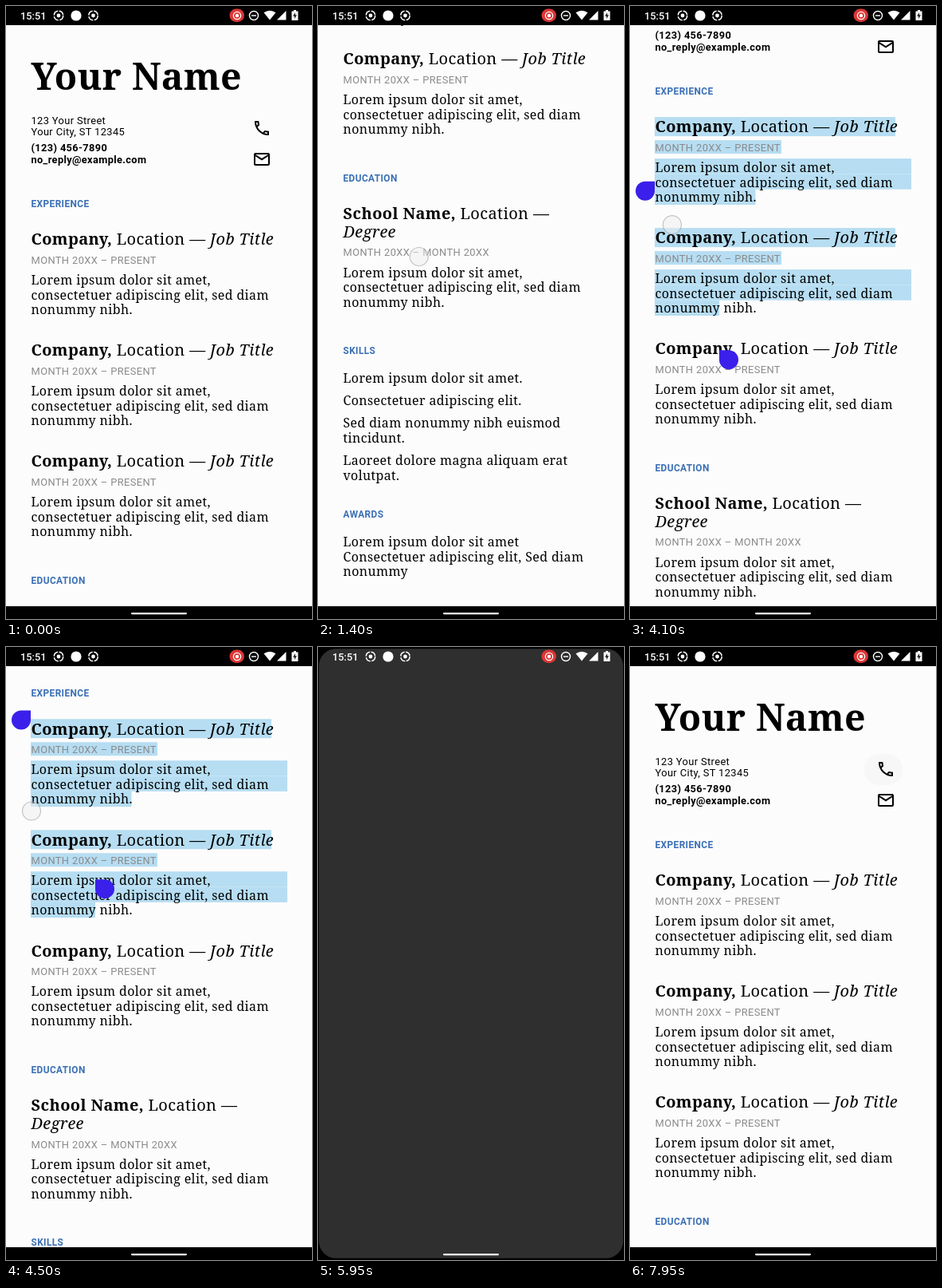
An HTML page for the animation above (8 s loop, 384 by 768 pixels).

```html
<!DOCTYPE html>
<html lang="en">
<head>
<meta charset="utf-8">
<title>Resume viewer</title>
<style>
html, body { margin: 0; width: 100%; height: 100%; overflow: hidden; background: #000; }
#stage { display: block; width: 384px; height: 768px; }
text { white-space: pre; font-family: Roboto, sans-serif; }
.title, .head, .body { font-family: "Noto Serif", serif; letter-spacing: .36px; }
.title { font-size: 46.4px; font-weight: 700; }
.head { font-size: 20px; }
.body { font-size: 16px; }
.b { font-weight: 700; }
.i { font-style: italic; }
.info { font-size: 12.9px; letter-spacing: .36px; }
.info.b { font-size: 12.8px; }
.date { font-size: 12.9px; letter-spacing: .38px; fill: #8b8b8b; }
.label { font-size: 11.9px; letter-spacing: .38px; font-weight: 700; fill: #3b70b5; }
.mid { text-anchor: middle; }
</style>
</head>
<body>
<svg id="stage" viewBox="0 0 384 768" xmlns="http://www.w3.org/2000/svg">
  <rect width="384" height="768"/>
  <g id="docWin">
    <rect width="384" height="768"/>
    <svg y="24" width="384" height="728" viewBox="0 24 384 728">
      <rect y="24" width="384" height="728" fill="#fcfcfc"/>
      <g id="doc">
        <g id="marks" fill="#b6ddf2"></g>
        <rect id="ripple" x="294" y="134" width="48" height="39" rx="19" fill="#d9d9d9"/>
        <path transform="translate(309 141)" d="M6.54 5c.06.89.21 1.76.45 2.59l-1.2 1.2c-.41-1.2-.67-2.47-.76-3.79h1.51m9.86 12.02c.85.24 1.72.39 2.6.45v1.49c-1.32-.09-2.59-.35-3.8-.75l1.2-1.19M7.5 3H4c-.55 0-1 .45-1 1 0 9.39 7.61 17 17 17 .55 0 1-.45 1-1v-3.49c0-.55-.45-1-1-1-1.24 0-2.45-.2-3.57-.57-.1-.04-.21-.05-.31-.05-.26 0-.51.1-.71.29l-2.2 2.2c-2.83-1.45-5.15-3.76-6.59-6.59l2.2-2.2c.28-.28.36-.67.25-1.02C8.7 6.45 8.5 5.25 8.5 4c0-.55-.45-1-1-1z"/>
        <g transform="translate(309 180)" fill="none" stroke="#000" stroke-width="2">
          <rect x="3" y="5" width="18" height="14" rx="1"/><path d="M3 6.500l9 5.700 9-5.700"/>
        </g>
        <g id="copy"></g>
      </g>
      <g id="grips" fill="#3a20ea">
        <path id="gripA" d="M0 0V12A12 12 0 1 1 -12 0Z"/>
        <path id="gripB" d="M0 0V12A12 12 0 1 0 12 0Z"/>
      </g>
    </svg>
  </g>
  <g id="dialWin">
    <rect id="dialBack" width="384" height="768" fill="#2f2f2f"/>
    <g id="people"></g>
    <g id="pad"></g>
  </g>
  <g id="status" fill="#fff">
    <text x="18" y="16.800" font-size="12.800" font-weight="500">15:51</text>
    <g id="rec" fill="none" stroke="#fff" stroke-width="1.500"></g>
    <circle cx="88" cy="12" r="6.600"/>
    <rect x="280.500" y="3.500" width="18.500" height="16.500" rx="8.200" fill="#dc3636"/>
    <circle cx="290" cy="12" r="4.600" fill="none" stroke="#fff" stroke-width="1.300"/>
    <circle cx="290" cy="12" r="2.200"/>
    <circle cx="311" cy="12" r="5.500" fill="none" stroke="#fff" stroke-width="1.400"/>
    <path d="M308 11.300h6v1.400h-6z"/>
    <path d="M323.500 8.300Q331 3 338.500 8.300L331 17.500Z"/>
    <path d="M340 17.500L351.500 6V17.500Z"/>
    <path d="M361 5h3v1.500h2.500v11.500h-8v-11.500h2.500z"/>
    <path d="M363 8l-3 4.700h2v3.300l3-4.700h-2z" fill="#222"/>
    <rect x="157" y="760" width="70" height="2.200" rx="1.100"/>
  </g>
  <circle id="touch" r="11.500" fill="#eee" fill-opacity=".5" stroke="#999" stroke-opacity=".55" stroke-width="1.200"/>
</svg>
<script>
const LOOP = 8000, LEFT = 31.5, LEADING = 18.6, BLOCK = 139;
const $ = id => document.getElementById(id);
const set = (id, name, value) => $(id).setAttribute(name, value);
const ramp = (t, a, b) => Math.min(1, Math.max(0, (t - a) / (b - a)));
const mix = (a, b, u) => a + (b - a) * u;
const smooth = u => u * u * (3 - 2 * u);
const fling = u => Math.sin(u * Math.PI / 2);
const settle = u => 1 - (1 - u) ** 3;

// ---- document: text flows down from a cursor ----
let copy = "", cursor = 0;

function put(gap, cls, ...rows) {
  cursor += gap;
  rows.forEach((s, i) => {
    if (i) cursor += LEADING;
    copy += `<text class="${cls}" x="${LEFT}" y="${cursor}">${s}</text>`;
  });
}

function entry(name, title, dates, gap) {
  put(gap, "head", `<tspan class="b">${name},</tspan> Location — ${title}`);
  if (!title) put(22.7, "head i", "Degree");
  put(23.5, "date", dates);
  put(26.2, "body", "Lorem ipsum dolor sit amet,", "consectetuer adipiscing elit, sed diam", "nonummy nibh.");
}

put(105.3, "title", "Your Name");
put(42.2, "info", "123 Your Street");
put(14.8, "info", "Your City, ST 12345");
put(20, "info b", "(123) 456-7890");
put(14.9, "info b", "no_reply@example.com");
put(54.5, "label", "EXPERIENCE");
for (const gap of [47.6, 52.1, 52.1])
  entry("Company", '<tspan class="i">Job Title</tspan>', "MONTH 20XX – PRESENT", gap);
put(59.3, "label", "EDUCATION");
entry("School Name", "", "MONTH 20XX – MONTH 20XX", 47.6);
put(59.3, "label", "SKILLS");
put(35.6, "body", "Lorem ipsum dolor sit amet.");
put(28.4, "body", "Consectetuer adipiscing elit.");
put(28.4, "body", "Sed diam nonummy nibh euismod", "tincidunt.");
put(28.4, "body", "Laoreet dolore magna aliquam erat", "volutpat.");
put(47.4, "label", "AWARDS");
put(35.6, "body", "Lorem ipsum dolor sit amet", "Consectetuer adipiscing elit, Sed diam", "nonummy");
$("copy").innerHTML = copy;

// ---- dialer ----
const label = (x, y, size, fill, s, cls = "") =>
  `<text class="${cls}" x="${x}" y="${y}" font-size="${size}" fill="${fill}">${s}</text>`;
const plus = '<circle cx="9" cy="8" r="3.200"/><path d="M2.500 19v-1.500c0-2.500 4-3.700 6.500-3.700s6.500 1.200 6.500 3.700V19zM19 7v6M16 10h6"/>';
const chat = '<path d="M3 3h18v18l-4-4H3zM6 7h12M6 10h12M6 13h12"/>';
const actions = [[plus, "Create new contact"], [plus, "Add to a contact"], [chat, "Send a message"]];

$("people").innerHTML =
  '<path d="M0 20Q0 0 20 0H364Q384 0 384 20V367H0Z" fill="#202126"/>' +
  label(23, 56, 10.5, "#9a9ca2", "ALL CONTACTS") +
  '<circle cx="42" cy="110" r="19.500" fill="#e94fae"/>' +
  label(42, 118, 23, "#3c1c40", "J", "mid") +
  label(76, 107, 15, "#e8e8ea", "Jo") + label(76, 125, 12, "#9a9ca2", "Mobile") +
  actions.map(([icon, s], i) =>
    `<g transform="translate(26 ${154 + 46 * i})" fill="none" stroke="#9aa8ee" stroke-width="1.800">${icon}</g>` +
    label(76, 171 + 46 * i, 14.5, "#a9b6f2", s)).join("");

const letters = ["", "ABC", "DEF", "GHI", "JKL", "MNO", "PQRS", "TUV", "WXYZ", "", "+", ""];
$("pad").innerHTML =
  '<rect y="367" width="384" height="53" fill="#2c2c2f"/><path d="M0 420.500H384" stroke="#4b4b4e"/>' +
  [388, 394, 400].map(y => `<circle cx="26.500" cy="${y}" r="1.900" fill="#b4b4b8"/>`).join("") +
  label(192, 403, 25, "#ececee", "(123) 456-7890", "mid") +
  '<path d="M341 394l6-7h15v14h-15zM351 391l6 6m0-6l-6 6" fill="none" stroke="#b4b4b8" stroke-width="1.600"/>' +
  [..."123456789*0#"].map((key, i) => {
    const x = 68 + 124 * (i % 3), y = 460 + 62 * Math.floor(i / 3);
    return label(x, y, 29, "#8fa6f0", key, "mid") + label(x, y + 14, 11, "#9c9ca0", letters[i], "mid");
  }).join("") +
  '<rect x="132" y="684" width="120" height="44" rx="22" fill="#35a853"/>' +
  label(192, 711, 15, "#fff", "Call", "mid");

$("rec").innerHTML = [66, 109.5].map(x =>
  `<circle cx="${x}" cy="12" r="5.700" stroke-dasharray="7.400 1.550"/><circle cx="${x}" cy="12" r="2.400" fill="#fff" stroke="none"/>`).join("");

// ---- motion ----
const scrollAt = t =>
  650 * (fling(ramp(t, 50, 850)) - fling(ramp(t, 1300, 2000))) +
  279 * (smooth(ramp(t, 3950, 4250)) - smooth(ramp(t, 4350, 4750)));

// down, up: press times; move: span of the stroke; from, to: its ends
const swipes = [
  { down: 50, up: 900, move: [50, 500], from: [85, 640], to: [59, 124] },
  { down: 950, up: 2000, move: [1250, 1700], from: [113, 164], to: [235, 611] },
  { down: 2720, up: 3860, move: [3350, 3800], from: [63, 296.5], to: [108, 525] },
  { down: 3950, up: 4300, move: [3950, 4250], from: [60, 420], to: [32, 130] },
  { down: 4300, up: 4620, move: [4350, 4600], from: [32, 130], to: [32, 255] },
  { down: 5200, up: 5520, move: [5200, 5520], from: [318, 154], to: [318, 154] },
  { down: 6900, up: 7150, move: [6900, 7150], from: [60, 763], to: [377, 763] }
];

function drawTouch(t) {
  const s = swipes.find(p => t >= p.down && t < p.up);
  $("touch").style.display = s ? "" : "none";
  if (!s) return;
  const u = ramp(t, ...s.move);
  set("touch", "cx", mix(s.from[0], s.to[0], u * u));
  set("touch", "cy", mix(s.from[1], s.to[1], u));
  set("touch", "opacity", s.from[1] > 752 ? .45 : 1);
}

// selectable rows of one job: heading, dates, three body lines
const jobRows = top => [
  { top, height: 24, right: 333 },
  { top: top + 29, height: 17, right: 190 },
  ...[353, 353, 157.5].map((right, i) => ({ top: top + 52 + 19.3 * i, height: 19.3, right }))
];
const rows = [...jobRows(280), ...jobRows(280 + BLOCK)];

function drawSelection(t) {
  const on = t >= 3250 && t < 5000;
  $("marks").style.display = $("grips").style.display = on ? "" : "none";
  if (!on) return;
  const reach = mix(296, 525, ramp(t, 3350, 3800));
  const picked = rows.filter(r => r.top <= reach);
  const last = picked[picked.length - 1];
  const end = picked.length === 1 ? 131 : 112;
  $("marks").innerHTML = picked.map(r =>
    `<rect x="31" y="${r.top}" width="${(r === last ? end : r.right) - 31}" height="${r.height}"/>`).join("");
  const late = scrollAt(t - 40);
  set("gripA", "transform", `translate(31 ${306 - late})`);
  set("gripB", "transform", `translate(${end} ${last.top + 8 - late})`);
}

function drawWindows(t) {
  const slide = 400 * (1 - smooth(ramp(t, 5550, 5950)) + settle(ramp(t, 6900, 7370)));
  const scale = 1 - .06 * Math.sin(Math.PI * ramp(t, 5500, 5965));
  const shrink = `${192 * (1 - scale)} ${384 * (1 - scale)}) scale(${scale})`;
  set("docWin", "transform", `translate(${slide - 400} 0) translate(${shrink}`);
  set("dialWin", "transform", `translate(${slide} 0) translate(${shrink}`);
  $("dialWin").style.display = slide < 400 ? "" : "none";
  set("dialBack", "rx", 22 * (1 - ramp(t, 5950, 6050) + ramp(t, 6900, 6950)));
  set("pad", "opacity", ramp(t, 6180, 6350));
  set("people", "opacity", ramp(t, 6380, 6600));
  set("ripple", "opacity", ramp(t, 5430, 5530) * (1 - .87 * ramp(t, 7300, 7980)));
}

function draw() {
  const t = performance.now() % LOOP;
  set("doc", "transform", `translate(0 ${-scrollAt(t)})`);
  drawSelection(t);
  drawWindows(t);
  drawTouch(t);
  requestAnimationFrame(draw);
}
draw();
</script>
</body>
</html>
```
